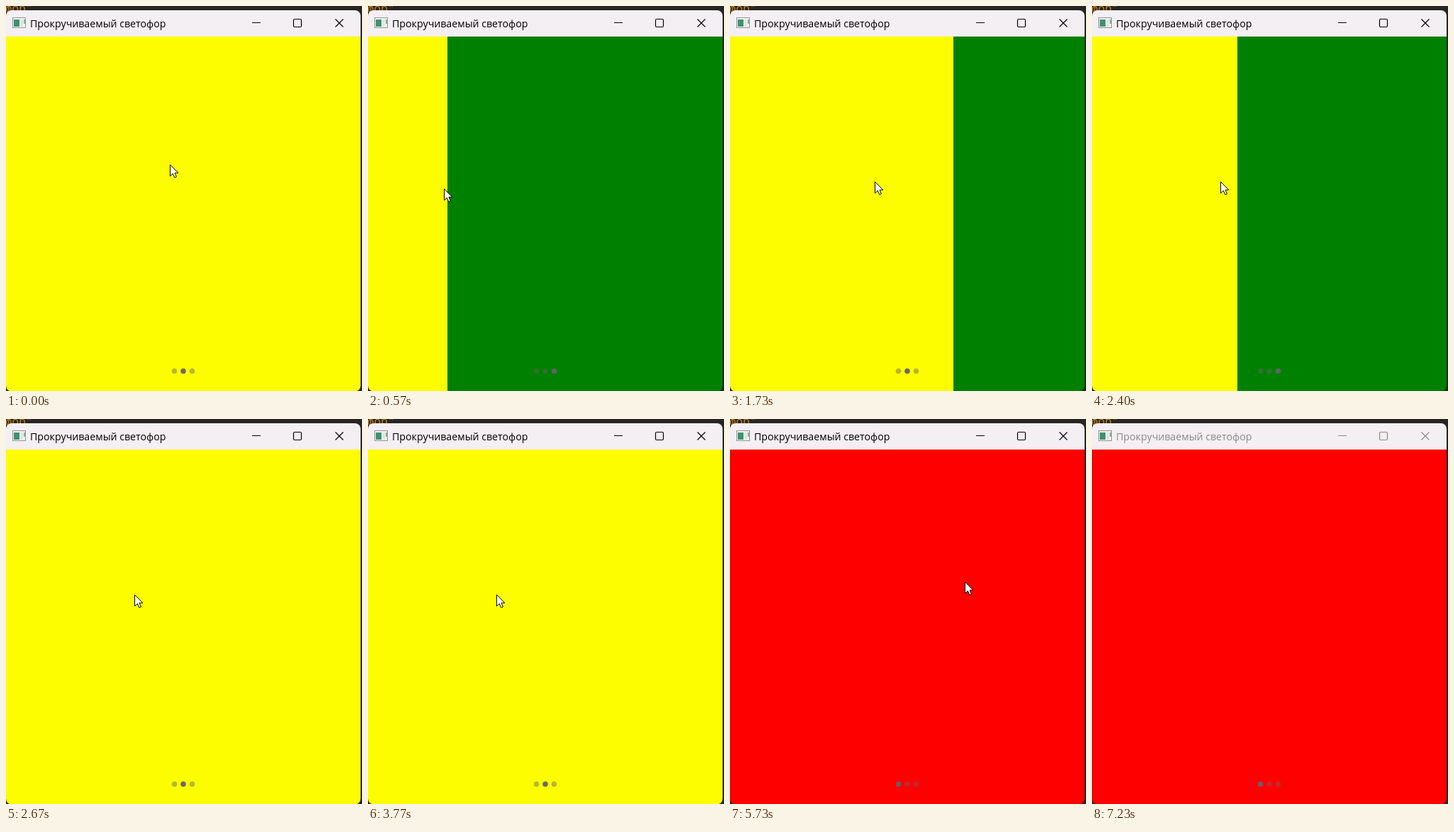
These frames come from a looping animation (502 px wide and 542 px high, 7.26 s). An HTML page:

```html
<!DOCTYPE html>
<html lang="ru">
<head>
<meta charset="utf-8">
<title>Прокручиваемый светофор</title>
<style>
  html, body { margin: 0; width: 100%; height: 100%; overflow: hidden; background: #272522; }
  svg { display: block; width: 502px; height: 542px; }
  .title { font: 14.2px "Open Sans", "Noto Sans", sans-serif; }
  .code { font: 16px "Noto Sans Mono", "DejaVu Sans Mono", monospace; fill: #c47f1c; }
</style>
</head>
<body>
<svg viewBox="0 0 502 542">
  <defs>
    <clipPath id="frame"><rect y="6" width="500" height="536.5" rx="8"/></clipPath>
  </defs>
  <rect width="502" height="542" fill="#272522"/>
  <text class="code" x="-1" y="8.5">фор"</text>
  <g clip-path="url(#frame)">
    <rect y="6" width="500" height="37" fill="#f4eff2"/>
    <g id="pages">
      <rect y="43" width="500" height="500" fill="#ff0000"/>
      <rect x="500" y="43" width="500" height="500" fill="#fdfd00"/>
      <rect x="1000" y="43" width="500" height="500" fill="#008000"/>
    </g>
    <g id="dots" fill="#66606e">
      <circle cx="237.5" cy="514" r="3.8"/>
      <circle cx="250" cy="514" r="3.8"/>
      <circle cx="262.5" cy="514" r="3.8"/>
    </g>
  </g>
  <g>
    <rect x="9.5" y="16.5" width="18" height="14" fill="#f4f4ee" stroke="#8d93a0"/>
    <rect x="11" y="19" width="8" height="10" fill="#3f9070"/>
    <rect x="20" y="19" width="4" height="10" fill="#dfe6e2"/>
    <rect x="25" y="19" width="2" height="6" fill="#86b58a"/>
  </g>
  <g id="caption">
    <text class="title" x="34" y="30" fill="currentColor">Прокручиваемый светофор</text>
    <g fill="none" stroke="currentColor" stroke-width="1.2">
      <path d="M347 23.5H359M464.5 18.5L475.5 29.5M475.5 18.5L464.5 29.5"/>
      <rect x="405.5" y="18.5" width="11" height="11" rx="1.5"/>
    </g>
  </g>
  <path id="cursor" d="M.5 .5V16.5L4.3 13L6.8 18.6L9.4 17.5L7 12H11.8Z" fill="#fff" stroke="#000" stroke-linejoin="round"/>
</svg>
<script>
const LOOP = 7260, STEP = 10, PAGE = 500, FADE = 100, BLUR_AT = 7100;
const RED = 0, YELLOW = 1, GREEN = 2;

const swipes = [
  { at: 220, time: 510, to: [GREEN] },
  { at: 780, time: 380, to: [YELLOW] },
  { at: 1495, time: 565, to: [GREEN] },
  { at: 2300, time: 226, to: [YELLOW] },
  { at: 4972, time: 358, to: [RED] }
];

const pointerMoves = [
  { at: 30, time: 480, to: [107, 257] },
  { at: 780, time: 400, to: [290, 247] },
  { at: 1540, time: 273, to: [181, 247] },
  { at: 3780, time: 650, to: [243, 227] },
  { at: 4930, time: 204, to: [330, 227] },
  { at: 5700, time: 530, to: [486, 517] },
  { at: 7000, time: 100, to: [505, 545] }
];

const clamp = u => Math.min(1, Math.max(0, u));
const ease = u => (1 - Math.cos(Math.PI * clamp(u))) / 2;

// Follow the moves one after another from the starting point
const follow = (from, moves, t) => moves.reduce((point, { at, time, to }) => {
  const k = ease((t - at) / time);
  return point.map((v, i) => v + (to[i] - v) * k);
}, from);

const pageAt = t => follow([YELLOW], swipes, t)[0];

const byId = id => document.getElementById(id);
const pages = byId("pages"), caption = byId("caption"), cursor = byId("cursor");
const dots = [...byId("dots").children];

function draw(t) {
  pages.setAttribute("transform", `translate(${-Math.round(pageAt(t) * PAGE)} 0)`);

  // A dot's strength is its share of the last FADE ms as the current page
  const recent = Array.from({ length: 10 }, (_, k) => Math.round(pageAt(t - k * FADE / 10)));
  dots.forEach((dot, i) => {
    const active = recent.filter(page => page === i).length / recent.length;
    dot.setAttribute("opacity", 0.45 + 0.5 * active);
  });

  const [x, y] = follow([231, 223], pointerMoves, t).map(Math.round);
  cursor.setAttribute("transform", `translate(${x} ${y})`);
  caption.setAttribute("color", t < BLUR_AT ? "#000" : "#8c8a86");
}

const start = performance.now();
function tick() {
  const t = (performance.now() - start) % LOOP;
  draw(Math.floor(t / STEP) * STEP);
  requestAnimationFrame(tick);
}
tick();
</script>
</body>
</html>
```
